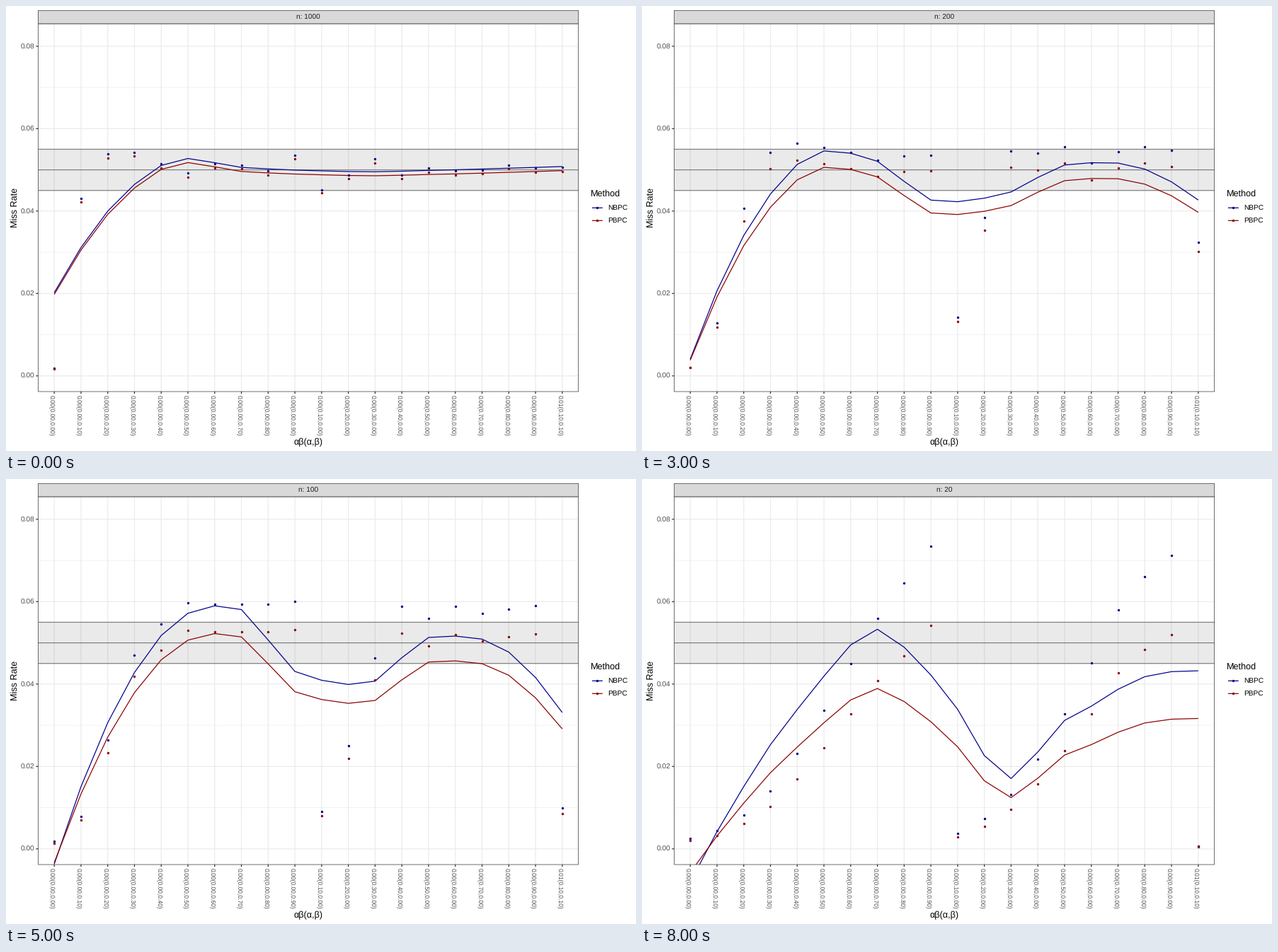
These frames come from a looping animation (890x629 px, 9000 ms). A matplotlib script:

```python
import math
import numpy as np
import matplotlib.pyplot as plt
from matplotlib.animation import FuncAnimation
from matplotlib.patches import Rectangle

W, H, DPI = 890, 629, 64
PX = 72 / DPI                       # points per pixel
L, R, TOP, BOTTOM = 45.5, 808.5, 25.0, 545.0
STEP = (R - L) / 20.2
X = L + STEP * (0.6 + np.arange(20))
SIZES = (1000, 500, 250, 200, 150, 100, 75, 50, 20)
BLUE, RED = "#00008B", "#8B0000"
GREY20, GREY30, GRID = "#333333", "#4D4D4D", "#EBEBEB"

plt.rcParams.update({"font.family": "Liberation Sans", "path.snap": False,
                     "text.hinting": "none"})

# (alpha, beta): none, beta only, alpha only, both
EFFECTS = ([(0, k / 10) for k in range(10)]
           + [(k / 10, 0) for k in range(1, 10)] + [(0.1, 0.1)])


def phi(z):
    return 0.5 * (1 + math.erf(z / math.sqrt(2)))


def power(a, b, n):
    """Chance of detecting the effects; two paths must both be found."""
    z, cut = (a + b) * math.sqrt(n - 5), 2.1
    p = phi(z - cut) + phi(-z - cut)
    return p * p if a and b else p


def simulate(n):
    """Miss rates of both methods, with shared sampling noise."""
    rng = np.random.default_rng(n)
    p = np.array([power(a, b, n) for a, b in EFFECTS])
    noise = 0.0016 * np.sqrt(p) * rng.normal(size=20)
    levels = 0.0496 * (1 + 5.5 * n ** -0.75), 0.05 * (1 + 3 / n)
    return [np.round((level * p + noise) * 5000) / 5000 for level in levels]


def loess(y, span=0.75):
    """Local quadratic fit at a few knots, joined by cubic Hermite pieces."""
    x = np.arange(len(y))
    margin = 0.005 * x[-1]
    knots = np.array([-margin, 2, 4, 7, 9, 12, 14, 17, x[-1] + margin])
    val, slope = [], []
    for k in knots:
        d = np.abs(x - k)
        h = np.sort(d)[int(span * len(y)) - 1]
        w = np.clip(1 - (d / h) ** 3, 0, None) ** 1.5
        _, b, a = np.polyfit(x - k, y, 2, w=w)
        val.append(a)
        slope.append(b)
    val, slope = np.array(val), np.array(slope)
    i = np.searchsorted(knots, x, side="right") - 1
    gap = knots[i + 1] - knots[i]
    t = (x - knots[i]) / gap
    return ((2 * t**3 - 3 * t**2 + 1) * val[i] + (3 * t**2 - 2 * t**3) * val[i + 1]
            + gap * ((t**3 - 2 * t**2 + t) * slope[i] + (t**3 - t**2) * slope[i + 1]))


def to_y(rate):
    return 522.8 - rate * 5824


fig = plt.figure(figsize=(W / DPI, H / DPI), dpi=DPI, facecolor="white")
ax = fig.add_axes([0, 0, 1, 1])
ax.set_xlim(0, W)
ax.set_ylim(H, 0)
ax.axis("off")


def line(x, y, color, width=1.23, z=1):
    return ax.plot(x, y, color=color, lw=width * PX, zorder=z,
                   solid_capstyle="butt", solid_joinstyle="round")[0]


def dots(x, y, color, z=6):
    return ax.plot(x, y, "o", color=color, ms=3.4 * PX, mew=0, zorder=z)[0]


def text(x, y, s, size, color="black", **kw):
    return ax.text(x, y, s, fontsize=size * PX, color=color, va="baseline",
                   rotation_mode="anchor", **kw)


def box(x0, y0, x1, y1, z=1, **kw):
    return ax.add_patch(Rectangle((x0, y0), x1 - x0, y1 - y0, zorder=z, **kw))


# Grid and axis labels
for rate in (0.01, 0.03, 0.05, 0.07):
    line([L, R], [to_y(rate)] * 2, GRID, 0.62)
for rate in (0, 0.02, 0.04, 0.06, 0.08):
    y = to_y(rate)
    line([L, R], [y, y], GRID)
    line([L - 3.2, L], [y, y], GREY20)
    text(40.2, y + 3.6, f"{rate:.2f}", 10.1, GREY30, ha="right")
for x, (a, b) in zip(X, EFFECTS):
    line([x, x], [TOP, BOTTOM], GRID)
    line([x, x], [BOTTOM, BOTTOM + 3.2], GREY20)
    text(x - 6.2, 550.2, f"{a * b:.2f}({a:.2f},{b:.2f})", 8.55, GREY30, rotation=-90)

# Tolerance band
box(L, to_y(0.055), R, to_y(0.045), 2, fc=GREY20, ec="none", alpha=0.1)
for rate in (0.045, 0.05, 0.055):
    line([L, R], [to_y(rate)] * 2, "#7F7F7F", 1.23, 3)

# Frame and strip
edge = dict(ec=GREY20, lw=0.7 * PX)
panel = box(L, TOP, R, BOTTOM, 8, fc="none", **edge)
box(L, 6.3, R, TOP, 8, fc="#D9D9D9", **edge)
strip = text((L + R) / 2, 19.2, "", 10.1, "#1A1A1A", ha="center", zorder=9)

# Titles and legend
text((L + R) / 2, 620.2, "αβ(α,β)", 12.6, ha="center")
text(15.6, 285, "Miss Rate", 12.6, rotation=90, ha="center")
text(825.8, 268.8, "Method", 12.6)
for name, color, y in (("NBPC", BLUE, 285.3), ("PBPC", RED, 303.3)):
    line([828, 842.8], [y, y], color)
    dots([835.4], [y], color)
    text(850.6, y + 3.7, name, 10.1)

curves, points = [], []
for k, color in enumerate((BLUE, RED)):
    curves.append(line([], [], color, 1.23, 4 + k))
    points.append(dots([], [], color, 6 + k))
    curves[k].set_clip_path(panel)

RATES = [simulate(n) for n in SIZES]


def update(i):
    strip.set_text(f"n: {SIZES[i]}")
    for curve, pts, rate in zip(curves, points, RATES[i]):
        curve.set_data(X, to_y(loess(rate)))
        pts.set_data(X, to_y(rate))
    return [strip, *curves, *points]


anim = FuncAnimation(fig, update, frames=len(SIZES), interval=1000,
                     repeat=True, repeat_delay=0, blit=False)
plt.show()
```
